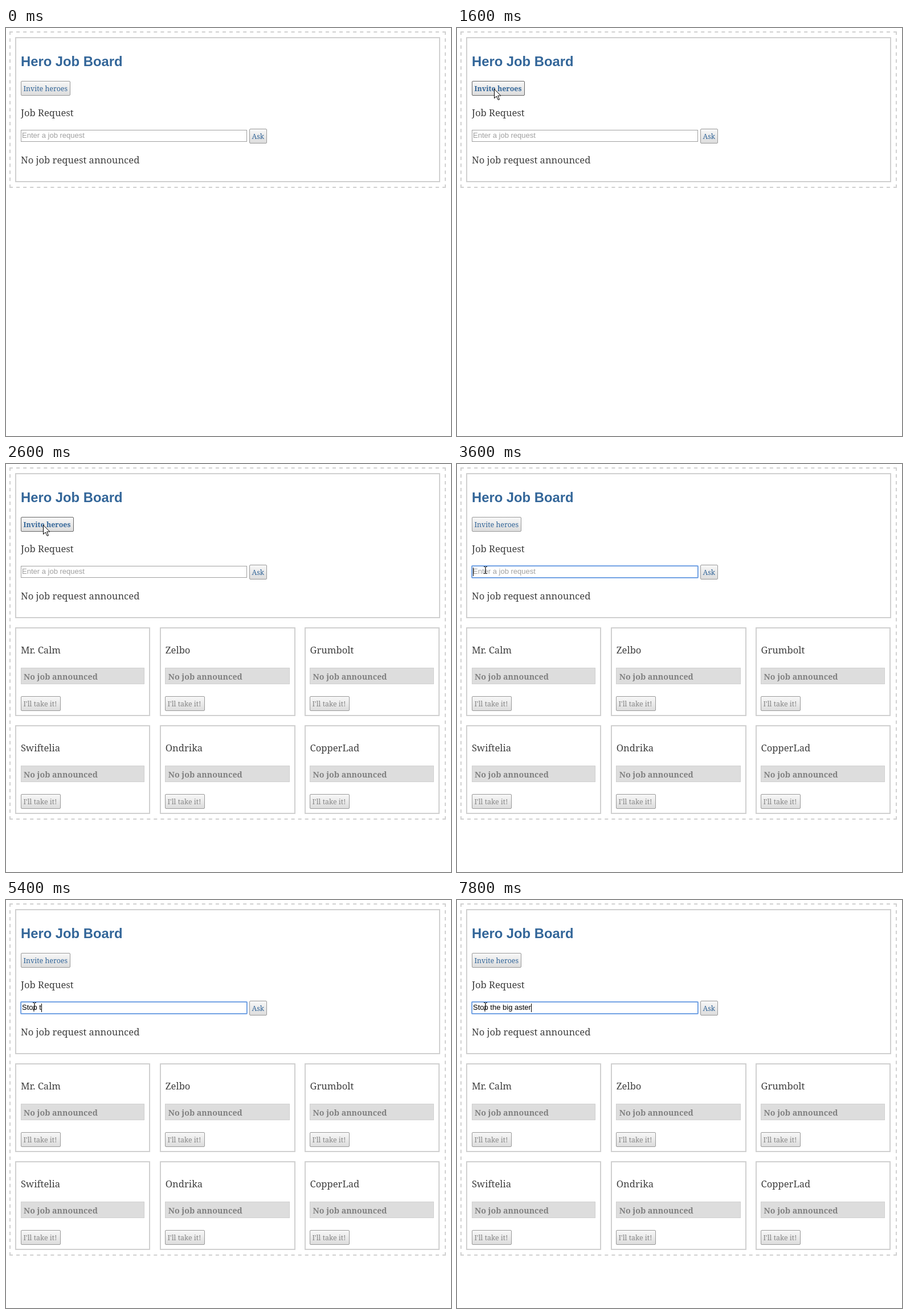
An HTML page for the animation above (8000 ms loop, 781 by 717 pixels).

```html
<!DOCTYPE html>
<html lang="en">
<head>
<meta charset="utf-8">
<title>Hero Job Board</title>
<style>
  html, body { margin: 0; width: 100%; height: 100%; overflow: hidden; background: #fff; }
  svg { display: block; }
  text { white-space: pre; font-family: "Noto Serif", Cambria, serif; }
  .title { font: bold 23.8px "Liberation Sans", Arial, sans-serif; fill: #369; }
  .body { font-size: 16.6px; fill: #404040; }
  .label { font-size: 12.4px; fill: #369; }
  .off { fill: #888; }
  .bold { font-weight: bold; }
  .status { font-size: 14.2px; font-weight: bold; fill: #808080; }
  .entry { font: 13px "Liberation Sans", Arial, sans-serif; fill: #000; }
  .hint { fill: #a0a0a0; }
  .caret { fill: #000; shape-rendering: crispEdges; }
</style>
</head>
<body>
<svg id="stage" width="781" height="717" viewBox="0 0 781 717">
  <defs>
    <linearGradient id="up" x2="0" y2="1">
      <stop stop-color="#f8f8f8"/><stop offset="1" stop-color="#dcdcdc"/>
    </linearGradient>
    <linearGradient id="down" x2="0" y2="1">
      <stop stop-color="#dcdcdc"/><stop offset="1" stop-color="#f8f8f8"/>
    </linearGradient>
  </defs>
</svg>
<script>
const LOOP = 8000;
const LINE = "#d0d0d0";
const stage = document.getElementById("stage");
const names = ["Mr. Calm", "Zelbo", "Grumbolt", "Swiftelia", "Ondrika", "CopperLad"];

function add(tag, attrs, parent = stage) {
  const node = document.createElementNS("http://www.w3.org/2000/svg", tag);
  for (const key in attrs) node.setAttribute(key, attrs[key]);
  return parent.appendChild(node);
}

const group = parent => add("g", {}, parent);

function write(str, x, y, cls, parent) {
  const node = add("text", { x, y, class: cls }, parent);
  node.textContent = str;
  return node;
}

// Outlined box whose border lies inside the given edges.
function box(x, y, w, h, line, stroke, fill = "none", rx = 0, parent = stage) {
  return add("rect", {
    x: x + line / 2, y: y + line / 2, width: w - line, height: h - line,
    rx, fill, stroke, "stroke-width": line
  }, parent);
}

function button(str, x, y, w, cls, parent, border = "#999", fill = "url(#up)") {
  const g = group(parent);
  box(x, y, w, 26, 1, border, fill, 1.5, g);
  write(str, x + 4.5, y + 18, "label " + cls, g);
  return g;
}

// Dashes of 6 px; the gaps are fitted so that a side starts and ends with a dash.
function dashedSide(d, length, parent) {
  const count = Math.floor((length + 6) / 12);
  const gap = (length - 6 * count) / (count - 1);
  add("path", { d, stroke: LINE, "stroke-width": 2, "stroke-dasharray": `6 ${gap}` }, parent);
}

function dashedFrame(h) {
  const g = group();
  const w = 766;
  for (const y of [7, 5 + h]) dashedSide(`M6 ${y}h${w}`, w, g);
  for (const x of [7, 5 + w]) dashedSide(`M${x} 6v${h}`, h, g);
  return g;
}

function card(name, i, parent) {
  const col = i % 3;
  const y = 287 + 172 * Math.floor(i / 3);
  const [left, right] = [[16, 253], [270, 508], [524, 761]][col];
  const textX = 26 + 253.8 * col;
  const x = Math.floor(textX);
  box(left, y, right - left, 156, 2, LINE, "none", 0, parent);
  write(name, textX, y + 46, "body", parent);
  box(x, y + 71, right - 10 - x, 29, 1, LINE, "#ddd", 0, parent);
  write("No job announced", textX + 5, y + 92, "status", parent);
  button("I'll take it!", x, y + 121, 70, "off", parent);
}

const shortFrame = dashedFrame(275);
const tallFrame = dashedFrame(619);
box(16, 16, 746, 255, 2, LINE);
write("Hero Job Board", 26, 67, "title");
const invite = {
  idle: button("Invite heroes", 26, 93, 87, ""),
  hover: button("Invite heroes", 26, 93, 93, "bold", stage, "#666"),
  press: button("Invite heroes", 26, 93, 93, "bold", stage, "#888", "url(#down)")
};
write("Job Request", 26, 155, "body");

const blurred = box(26, 179, 397, 21, 1, "#a0a0a0", "#fff");
const focused = group();
box(25, 178, 399, 23, 2, "#8db4ec", "#fff", 1, focused);
box(26, 179, 397, 21, 1, "#5a92dc", "none", 0, focused);
const hint = write("Enter a job request", 28, 193, "entry hint");
const entry = write("", 28, 193, "entry");
const caret = add("rect", { y: 182, width: 1, height: 15, class: "caret" });

button("Ask", 427, 177, 31, "");
write("No job request announced", 26, 238, "body");
const cards = group();
names.forEach((name, i) => card(name, i, cards));

const arrow = add("path", {
  d: "M.5 .5V16.5L4.2 13L7 19H9.2V17.8L6.7 12H11.8Z",
  fill: "#fff", stroke: "#000", "stroke-width": 1
});
const beam = add("path", {
  d: "M47 180.5H49.5M50.5 180.5H53M50 181V192M47 192.5H49.5M50.5 192.5H53",
  fill: "none", stroke: "#000", "stroke-width": 1.2
});

// Each list holds [start time, value] pairs; values switch without easing.
const pointer = [
  [0, null], [1000, [86, 141]], [1200, [75, 123]], [1400, [68, 111]], [1600, [65, 107]],
  [2800, [62, 91]], [3000, [59, 125]], [3200, [54, 160]], [3400, null]
];
const inviteState = [[0, "idle"], [1400, "hover"], [2400, "press"], [2600, "hover"], [2800, "idle"]];
const typed = [[0, ""], [4400, "S"], [4800, "St"], [5000, "Sto"], [5200, "Stop"],
  [5400, "Stop t"], [5600, "Stop th"], [5800, "Stop the "]];

function type(start, before, letters) {
  for (let i = 0; i < letters.length; i++)
    typed.push([start + 200 * i, before + letters.slice(0, i + 1)]);
}
type(6000, "Stop the ", "big as");
type(7400, "Stop the big as", "ter");

const at = (list, t) => list.filter(([start]) => start <= t).pop()[1];
const show = (node, on) => node.setAttribute("visibility", on ? "visible" : "hidden");

function draw(now) {
  const t = now % LOOP;
  const invited = t >= 2600, active = t >= 3600;
  show(shortFrame, !invited);
  show(tallFrame, invited);
  show(cards, invited);

  const state = at(inviteState, t);
  for (const key in invite) show(invite[key], key === state);

  const str = at(typed, t);
  if (entry.textContent !== str) entry.textContent = str;
  show(blurred, !active);
  show(focused, active);
  show(hint, !str);
  show(caret, active && !(t >= 4200 && t < 4400));
  caret.setAttribute("x", Math.round(28 + (str ? entry.getComputedTextLength() : 0)));

  const tip = at(pointer, t);
  show(arrow, tip);
  if (tip) arrow.setAttribute("transform", `translate(${tip})`);
  show(beam, t >= 3400);
}

function tick() {
  draw(performance.now());
  requestAnimationFrame(tick);
}
tick();
</script>
</body>
</html>
```
